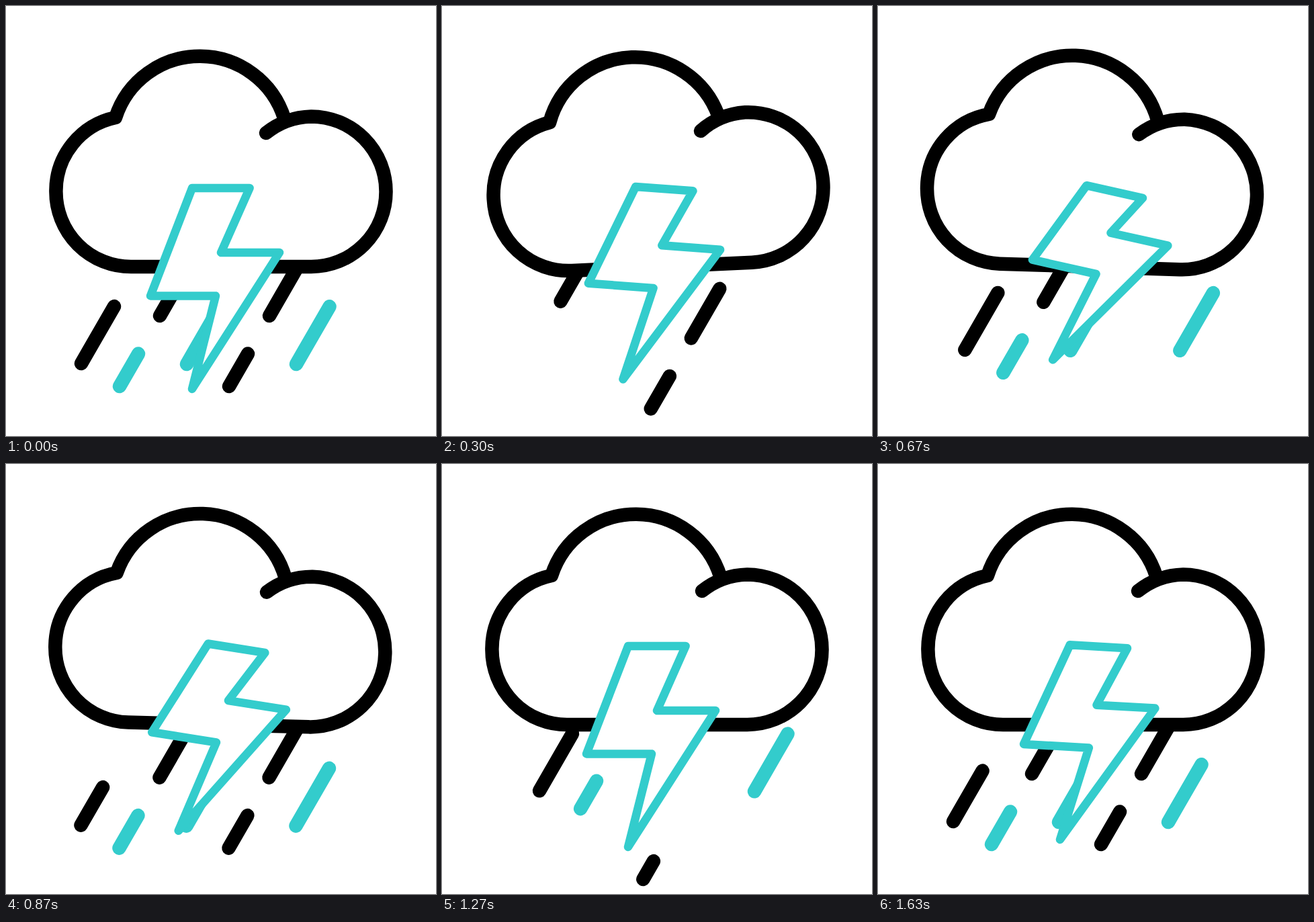
Recreate the animation shown at these times as an HTML page. Size 640 by 640 pixels, loop 1670 ms.

```html
<!DOCTYPE html>
<html>
<head>
<meta charset="utf-8">
<style>
  html, body { margin: 0; width: 100%; height: 100%; overflow: hidden; background: #fff; }
  svg { display: block; width: 100%; height: 100%; }
  path { fill: #fff; stroke-linecap: round; stroke-linejoin: round; }
</style>
</head>
<body>
<svg viewBox="0 0 640 640">
  <g id="rain"></g>
  <path id="cloud" stroke="#000" stroke-width="20.5" d="M387 189A111.5 111.5 0 0 1 454.3 164.4
    A111.5 111.5 0 0 1 565.5 276A111.5 111.5 0 0 1 454.3 388H186A111.7 111.7 0 0 1 74.4 276
    A111.7 111.7 0 0 1 163 166A131.8 131.8 0 0 1 414.3 167.5"/>
  <path id="bolt" stroke="#33cccc" stroke-width="12.5"/>
</svg>
<script>
const LOOP = 1670, FRAME = 33.34, LAST = 49;
const TEAL = '#33cccc', BLACK = '#000';
const byId = id => document.getElementById(id);
const clamp = v => Math.min(1, Math.max(0, v));
const linear = u => u;
const smooth = u => u * u * (3 - 2 * u);

// Keys are [time, ...values]; values hold before the first and after the last key.
function track(keys, t, ease) {
  let i = 0;
  while (i < keys.length - 2 && t >= keys[i + 1][0]) i++;
  const [t0, ...from] = keys[i], [t1, ...to] = keys[i + 1];
  const u = ease(clamp((t - t0) / (t1 - t0)));
  return from.map((v, k) => v + (to[k] - v) * u);
}

// The bolt swings once per period; its body also slides under the fixed top edge.
const SWING = 41;
const cloudTurn = [[4, 0], [13, -4.5], [21.5, 2.4], [32, 0]];
const boltTurn = [[2, 0], [20, 12.6], [37, 0]];
const boltSlide = [[2, 0, 0], [20, 7.5, -35], [31, -5.7, -3.7], [37, 0, 0]];
const boltTop = [[277, 271], [362.6, 271]];
const boltBody = [[320, 367], [407, 367], [277, 570], [312, 431.4], [215, 431.4]];

// Straight falls of the rain: leaving, crossing, arriving.
const falls = [
  [[0, 0, 0], [14, -33, 52]],
  [[6, 59, -80.3], [36.8, -32.7, 52]],
  [[30, 57, -79], [49, 0, 0]]
];
const PERIOD = 23.4, GROW = 3.4, SHRINK = 1.8;
const SLOPE = Math.PI / 6;

const drops = [
  { color: BLACK, x: 112, y: 532, length: 98, grow: 6.6, shrink: 2 },
  { color: BLACK, x: 229, y: 461, length: 85, grow: 9.5, shrink: 4.3 },
  { color: BLACK, x: 392, y: 461, length: 85, grow: 20, shrink: 12.7 },
  { color: TEAL, x: 432, y: 533, length: 99, grow: 9.5, shrink: 5 },
  { color: TEAL, x: 169, y: 566, length: 56, grow: 11.7, shrink: 5 },
  { color: TEAL, x: 269, y: 533, length: 99, grow: 9.5, shrink: 4.3 },
  { color: BLACK, x: 332, y: 566, length: 56, grow: 20, shrink: 13.8 }
];

const lines = drops.map(({ color }) => falls.map(() => {
  const line = document.createElementNS('http://www.w3.org/2000/svg', 'path');
  line.setAttribute('stroke', color);
  line.setAttribute('stroke-width', 20.5);
  return byId('rain').appendChild(line);
}));

// A drop grows from its top end, and later shrinks toward its bottom end.
function drawDrop({ x, y, length, grow, shrink }, line, pass, t) {
  const [dx, dy] = track(falls[pass], t, linear);
  const end = clamp((t - grow - (pass - 1) * PERIOD) / GROW);
  const start = clamp((t - shrink - pass * PERIOD) / SHRINK);
  const point = u => {
    const up = length * (1 - u);
    return `${x + dx + up * Math.sin(SLOPE)} ${y + dy - up * Math.cos(SLOPE)}`;
  };
  line.setAttribute('d', end > start ? `M${point(start)}L${point(end)}` : '');
}

function draw(t) {
  drops.forEach((drop, i) => lines[i].forEach((line, pass) => drawDrop(drop, line, pass, t)));
  byId('cloud').setAttribute('transform', `rotate(${track(cloudTurn, t, smooth)} 320 231)`);
  const swing = t % SWING;
  const [sx, sy] = track(boltSlide, swing, smooth);
  const points = boltTop.concat(boltBody.map(([x, y]) => [x + sx, y + sy]));
  byId('bolt').setAttribute('d', `M${points.join('L')}Z`);
  byId('bolt').setAttribute('transform', `rotate(${track(boltTurn, swing, smooth)} 311 420.5)`);
}

const began = performance.now();
function tick() {
  const ms = (performance.now() - began) % LOOP;
  draw(Math.min(LAST, Math.floor((ms + 4) / FRAME)));
  requestAnimationFrame(tick);
}
tick();
</script>
</body>
</html>
```
